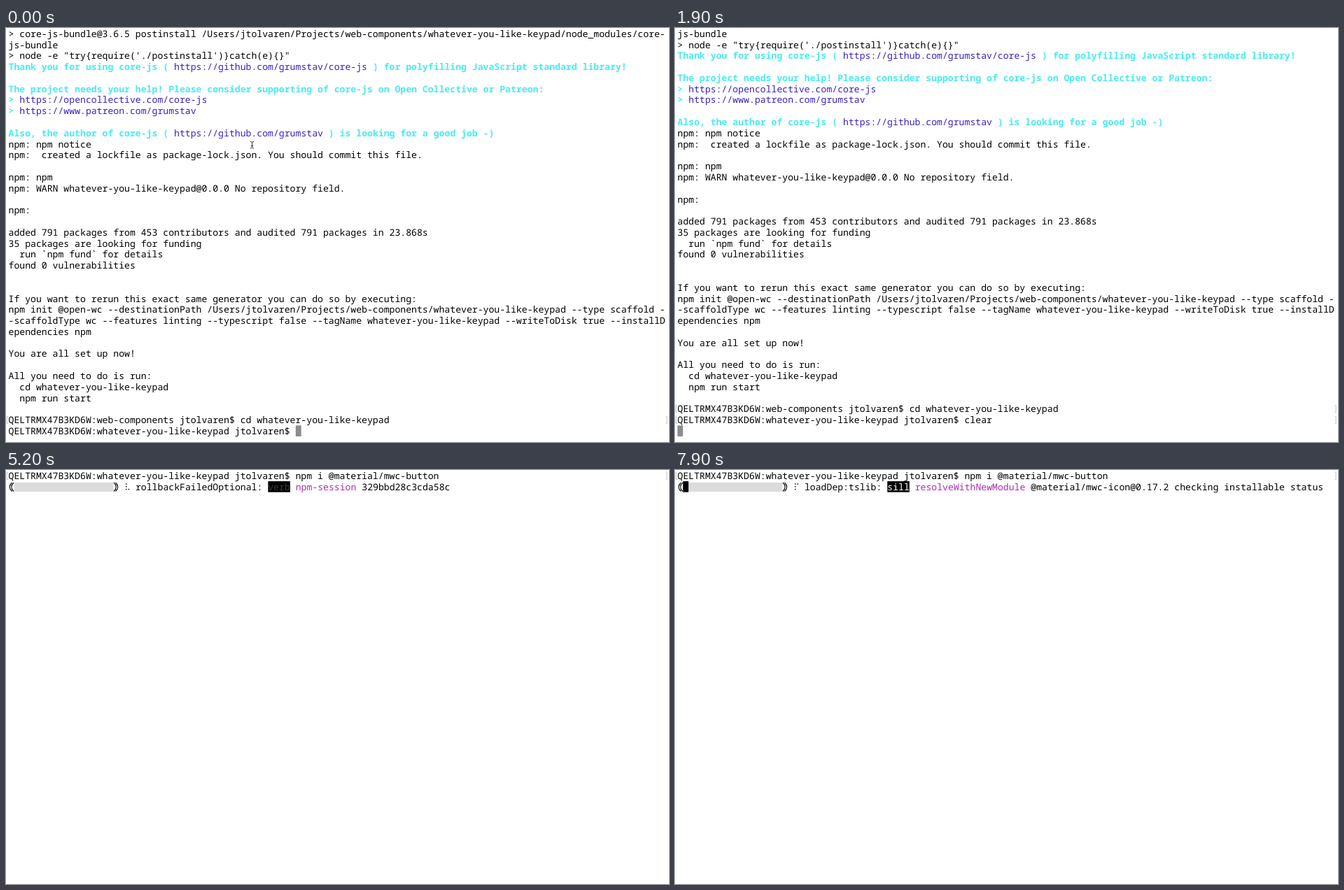
These frames come from a looping animation (947x592 px, 8 s). An HTML page:

```html
<!DOCTYPE html>
<html lang="en">
<head>
<meta charset="utf-8">
<title>Terminal session</title>
<style>
  html, body { margin: 0; width: 100%; height: 100%; overflow: hidden; background: #fff; }
  svg { display: block; }
  text {
    font: 500 13.15px "Noto Sans Mono", "DejaVu Sans Mono", monospace;
    white-space: pre;
    text-rendering: geometricPrecision;
    font-variant-ligatures: none;
    fill: #000;
  }
  .cyan { fill: #4aebee; font-weight: 600; }
  .link { fill: #3a22c0; }
  .pink { fill: #a92fae; }
  .inv { fill: #fff; }
  .dim { fill: #3c3c3c; }
</style>
</head>
<body>
<svg width="947" height="592" viewBox="0 0 947 592">
  <defs>
    <pattern id="shade" width="2" height="2" patternUnits="userSpaceOnUse">
      <path d="M0 0h1v1h-1zM1 1h1v1h-1z" fill="#b8b8b8"/>
    </pattern>
  </defs>
  <g id="screen"></g>
</svg>
<script>
const LOOP = 8000, LEFT = 3.5, CELL = 7.89, ROW = 15.78, BASE = 12.8;
const user = 'jtolvaren', author = 'grumstav', host = 'QELTRMX47B3KD6W';
const app = 'whatever-you-like-keypad';
const projects = `/Users/${user}/Projects/web-components/${app}`;
const prompt = `${host}:${app} ${user}$ `;
const install = prompt + 'npm i @material/mwc-button';

// A leading ~ marks a cyan line.
const log = [
  `> core-js-bundle@3.6.5 postinstall ${projects}/node_modules/core-`,
  'js-bundle',
  `> node -e "try{require('./postinstall')}catch(e){}"`,
  `~Thank you for using core-js ( https://github.com/${author}/core-js ) for polyfilling JavaScript standard library!`,
  '',
  '~The project needs your help! Please consider supporting of core-js on Open Collective or Patreon:',
  '~> https://opencollective.com/core-js',
  `~> https://www.patreon.com/${author}`,
  '',
  `~Also, the author of core-js ( https://github.com/${author} ) is looking for a good job -)`,
  'npm: npm notice',
  'npm:  created a lockfile as package-lock.json. You should commit this file.',
  '',
  'npm: npm',
  `npm: WARN ${app}@0.0.0 No repository field.`,
  '',
  'npm:',
  '',
  'added 791 packages from 453 contributors and audited 791 packages in 23.868s',
  '35 packages are looking for funding',
  '  run `npm fund` for details',
  'found 0 vulnerabilities',
  '', '',
  'If you want to rerun this exact same generator you can do so by executing:',
  `npm init @open-wc --destinationPath ${projects} --type scaffold -`,
  `-scaffoldType wc --features linting --typescript false --tagName ${app} --writeToDisk true --installD`,
  'ependencies npm',
  '',
  'You are all set up now!',
  '',
  'All you need to do is run:',
  `  cd ${app}`,
  '  npm run start',
  '',
  `${host}:web-components ${user}$ cd ${app}`
];

const typed = [[900, 'c'], [1100, 'l'], [1200, 'e'], [1300, 'a'], [1500, 'r']];

// start, label, level, action, message, spinner dots (column, row), filled cells
const bend = [[0, 0], [0, 1], [0, 2], [1, 2]];
const hook = [[0, 0], [0, 1], [0, 2], [1, 0]];
const progress = [
  [4900, 'rollbackFailedOptional:', 'verb', 'npm-session', '329bbd28c3cda58c', bend, 0],
  [6700, 'loadIdealTree:loadAllDepsIntoIdealTree:', 'sill', 'install', 'loadIdealTree', bend, 0],
  [7000, 'loadDep:tslib:', 'sill', 'resolveWithNewModule', '@material/mwc-button@0.17.2 checking installable statu', bend, 0],
  [7800, 'loadDep:tslib:', 'sill', 'resolveWithNewModule', '@material/mwc-icon@0.17.2 checking installable status', hook, 1]
];

const colX = c => LEFT + c * CELL;
const esc = s => s.replace(/&/g, '&amp;').replace(/</g, '&lt;').replace(/>/g, '&gt;');
const span = (s, cls) => `<tspan class="${cls}">${esc(s)}</tspan>`;
const text = (col, row, body) => `<text x="${colX(col)}" y="${row * ROW + BASE}">${body}</text>`;
const block = (col, row, n, fill) =>
  `<rect x="${colX(col)}" y="${row * ROW + .3}" width="${n * CELL}" height="15.6" fill="${fill}"/>`;
const cursor = (col, row) => block(col, row, 1, '#8c8c8c');
const stroke = (d, color, width = 1) =>
  `<path d="${d}" fill="none" stroke="${color}" stroke-width="${width}"/>`;

function line(s, row) {
  if (!s) return '';
  if (s[0] !== '~') return text(0, row, esc(s));
  const parts = s.slice(1).split(/(https:\S+)/);
  return text(0, row, parts.map((p, i) => span(p, i % 2 ? 'link' : 'cyan')).join(''));
}

function marks(row) {
  const y = row * ROW + 3;
  return stroke(`M3 ${y}h-1.5v10.5h1.5M942.5 ${y}h1.5v10.5h-1.5`, '#c4c4c4');
}

const ibeam = stroke('M349 162.5q2.5 0 2.5 1.5v6.5q0 1.5 -2.5 1.5M354 162.5q-2.5 0 -2.5 1.5M354 172q-2.5 0 -2.5 -1.5M350 168.5h3', '#333');
const arcs = stroke('M8.5 18q-6.5 6 0 12.5M11 18q-6.5 6 0 12.5M156.5 18q6.5 6 0 12.5M154 18q6.5 6 0 12.5', '#000', 1.1);

function status([, label, level, action, message, dots, filled]) {
  return `<rect x="${colX(1)}" y="18" width="${18 * CELL}" height="13" fill="url(#shade)"/>`
    + block(1, 1, filled, '#000')
    + arcs
    + dots.map(([x, y]) => `<circle cx="${171.8 + x * 3.6}" cy="${20 + y * 3.8}" r=".85"/>`).join('')
    + block(24 + label.length, 1, 4, '#000')
    + text(23, 1, esc(label + ' ') + span(level, level === 'verb' ? 'dim' : 'inv')
      + ' ' + span(action, 'pink') + ' ' + esc(message));
}

function draw(t) {
  if (t < 2000) {
    const word = typed.filter(k => t >= k[0]).map(k => k[1]).join('');
    const up = t >= 1900 ? 1 : 0;
    const rows = [...log, prompt + word].slice(up);
    return rows.map(line).join('') + marks(35 - up)
      + (up ? marks(35) + cursor(0, 36) : cursor(prompt.length + word.length, 36))
      + (word ? '' : ibeam);
  }
  if (t < 4300) {
    const s = t < 3200 ? prompt : install;
    return line(s, 0) + cursor(s.length, 0);
  }
  const step = progress.filter(p => t >= p[0]).pop();
  return line(install, 0) + marks(0) + (step ? status(step) : cursor(0, 1));
}

const screen = document.getElementById('screen');
const start = performance.now();
let shown = '';
function tick() {
  const next = draw((performance.now() - start) % LOOP);
  if (next !== shown) screen.innerHTML = shown = next;
  requestAnimationFrame(tick);
}
tick();
</script>
</body>
</html>
```
